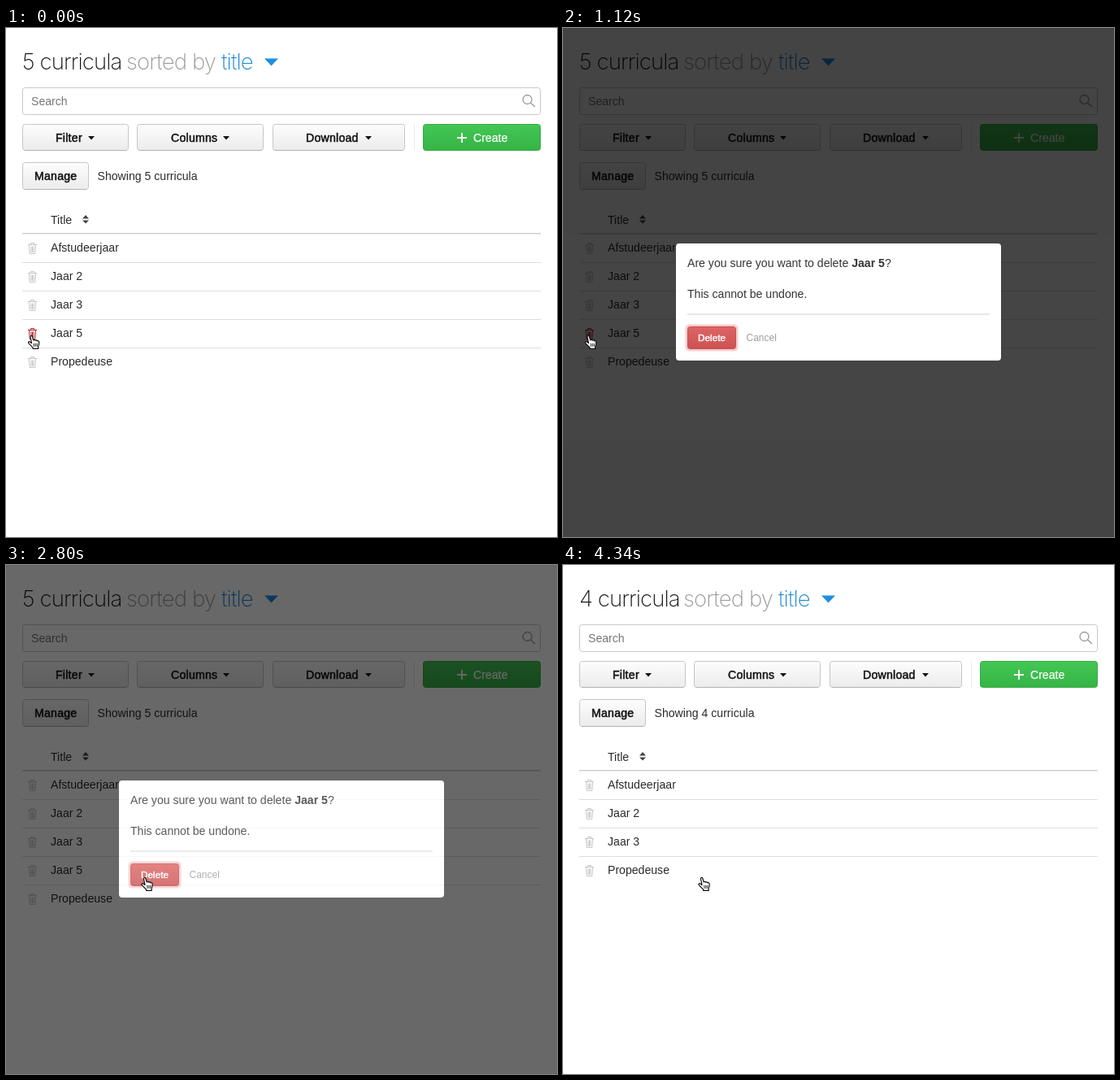
An HTML page that plays this animation: 678 by 626 pixels, repeating every 4410 ms.

```html
<!DOCTYPE html>
<html lang="en">
<head>
<meta charset="utf-8">
<title>Delete a curriculum</title>
<style>
  html, body { margin: 0; width: 100%; height: 100%; overflow: hidden; background: #ececec; }
  svg { display: block; width: 678px; height: 626px; }
  text { font: 14.1px "Liberation Sans", Arial, sans-serif; fill: #2b2b2b; white-space: pre; }
  .head { font: 200 27.5px Inter, Roboto, sans-serif; letter-spacing: -.85px; fill: #111; }
  .label { letter-spacing: .25px; fill: #111; stroke: #111; stroke-width: .5px; }
  .create { fill: #fff; stroke: #fff; stroke-width: .25px; }
  .small { font-size: 12px; }
  .rule { stroke: #dedede; }
  .trash { fill: none; stroke: #c6c6c6; }
  .trash.hot { stroke: #b3262c; }
</style>
</head>
<body>
<svg viewBox="0 0 678 626">
  <defs>
    <linearGradient id="grey" x2="0" y2="1"><stop stop-color="#fdfdfd"/><stop offset="1" stop-color="#ebebeb"/></linearGradient>
    <linearGradient id="green" x2="0" y2="1"><stop stop-color="#43c755"/><stop offset="1" stop-color="#35b445"/></linearGradient>
    <linearGradient id="red" x2="0" y2="1"><stop stop-color="#dd5d5d"/><stop offset="1" stop-color="#cb4a4a"/></linearGradient>
    <g id="bin">
      <path d="M27 266.5h11M30.5 266v-1.5h4v1.5M28.5 267l.7 10.5h6.6l.7-10.5M31 268.5v7.5M34 268.5v7.5M32.5 268.5v7.5"/>
    </g>
  </defs>

  <rect width="678" height="626" rx="4" fill="#fff"/>

  <text class="head" x="20" y="51"><tspan class="count">5</tspan> curricula</text>
  <text class="head" x="148" y="51" style="fill:#999">sorted by</text>
  <text class="head" x="265" y="51" style="fill:#1b87d6">title</text>
  <path d="M318 37.5h17l-8.5 9z" fill="#1f8fe0"/>

  <rect class="faint" x="20.5" y="73.5" width="637" height="33" rx="3" fill="none" stroke="#c9c9c9"/>
  <text x="31" y="95" style="fill:#777">Search</text>
  <g fill="none" stroke="#999" stroke-width="1.3">
    <circle cx="641.5" cy="88" r="5.5"/><path d="M645.5 92l5.5 5"/>
  </g>

  <g id="buttons"></g>
  <path d="M502.5 118v33" stroke="#ebebeb"/>
  <rect x="513.5" y="118.5" width="144" height="32" rx="3" fill="url(#green)" stroke="#36ab45"/>
  <path d="M555 135h12M561 129v12" stroke="#fff" stroke-width="1.8"/>
  <text class="create" x="575" y="140">Create</text>
  <text x="112.5" y="187">Showing <tspan class="count">5</tspan> curricula</text>

  <text x="55" y="241">Title</text>
  <path d="M94 234.5l4-4.5 4 4.5zM94 236.5h8l-4 4z" fill="#444"/>
  <path class="faint" d="M20 252.7h638" stroke="#cfcfcf" stroke-width="1.4"/>
  <g id="rows"></g>

  <g id="modal" opacity="0">
    <rect width="678" height="626" fill="#000" fill-opacity=".77"/>
    <rect x="139" y="265" width="400" height="144" rx="4" fill="#fff"/>
    <text x="153" y="294">Are you sure you want to delete <tspan font-weight="bold">Jaar 5</tspan>?</text>
    <text x="153" y="332">This cannot be undone.</text>
    <path d="M153 352h372" stroke="#e6e6e6" stroke-width="2"/>
    <rect x="150.5" y="364.5" width="65" height="33" rx="5" fill="#f6cccc"/>
    <rect x="153.5" y="367.5" width="59" height="27" rx="3" fill="url(#red)" stroke="#c24747"/>
    <text class="small" x="166" y="385" style="fill:#fff;stroke:#fff;stroke-width:.45px;font-size:11.8px">Delete</text>
    <text class="small" x="225.5" y="385" style="fill:#999">Cancel</text>
  </g>

  <g id="hand" stroke="#111" stroke-linejoin="round" stroke-linecap="round">
    <path fill="#fff" stroke-width="1.2" d="M3 2C2.6.4 4.9-.2 5.4 1.5L6.7 6C7.5 5 8.7 5.3 9 6.2C10 5.4 11.2 5.9 11.4 6.9C12.6 6.4 13.6 7 13.7 8.3C13.9 10.6 13.6 12 12.7 13.5V16.4H6.2L6 15C4.2 13.5 2.2 11 .8 9.6C-.2 8.2 1.3 7.2 2.5 8L4.5 9.6Z"/>
    <path d="M7.3 10.2l.2 3.2M9.3 10.2l.1 3.2M11.3 10.2v3.2" stroke-width=".9"/>
  </g>
</svg>
<script>
const LOOP = 4410, STEP = 70, REMOVED = 3220, ROW = 35;
const $ = id => document.getElementById(id);
const all = name => [...document.querySelectorAll(name)];

// Grey buttons: label, x, y, width, height, text x, caret x
$('buttons').innerHTML = [
  ['Filter', 20, 118, 131, 33, 61, 101],
  ['Columns', 161, 118, 156, 33, 203, 267],
  ['Download', 328, 118, 163, 33, 369, 442],
  ['Manage', 20, 165, 82, 34, 35, 0]
].map(([label, x, y, w, h, tx, caret]) => `
  <rect x="${x + .5}" y="${y + .5}" width="${w - 1}" height="${h - 1}" rx="3" fill="url(#grey)" stroke="#c6c6c6"/>
  <path d="M${x + 3} ${y + h - .5}h${w - 6}" stroke="#b2b2b2"/>
  <text class="label" x="${tx}" y="${y + 22}">${label}</text>
  ${caret ? `<path d="M${caret} 133h8l-4 4.5z" fill="#111"/>` : ''}`).join('');

$('rows').innerHTML = ['Afstudeerjaar', 'Jaar 2', 'Jaar 3', 'Jaar 5', 'Propedeuse'].map((name, i) => `
  <g class="row" transform="translate(0 ${i * ROW})">
    ${i ? '<path class="rule faint" d="M20 253.5h638"/>' : ''}
    <use class="trash faint" href="#bin"/>
    <text x="55" y="275">${name}</text>
  </g>`).join('');

const rows = all('.row'), counts = all('.count'), faint = all('.faint');
const doomed = rows[3], last = rows[4];
const hotBin = doomed.querySelector('.trash'), lastRule = last.querySelector('.rule');

const linear = k => k;
const smooth = k => k * k * (3 - 2 * k);

// Value at time t in a table of [ms, value]
function at(table, t, ease = linear) {
  const i = table.findIndex(([ms]) => ms > t);
  if (i === 0) return table[0][1];
  if (i < 0) return table[table.length - 1][1];
  const [a, from] = table[i - 1], [b, to] = table[i];
  return from + (to - from) * ease((t - a) / (b - a));
}

const shade = [[980, 0], [1050, .5], [1120, .95], [1190, 1], [2730, 1], [2800, .77], [2870, .42], [2940, .075], [3010, 0]];
const lines = [[1120, 1], [1260, .3], [2730, .3], [2800, 1]];
const handX = [[1400, 27], [1820, 163.5], [1960, 164], [2240, 166.5]];
const handY = [[1400, 378], [1820, 382], [1960, 382.5], [2240, 384]];

function draw(t) {
  const gone = t >= REMOVED;
  $('modal').setAttribute('opacity', at(shade, t));
  $('hand').setAttribute('transform', `translate(${at(handX, t, smooth)} ${at(handY, t, smooth)})`);
  const alpha = at(lines, t);
  faint.forEach(el => el.style.opacity = alpha);
  hotBin.classList.toggle('hot', t < 1540);
  counts.forEach(el => el.textContent = gone ? 4 : 5);
  doomed.style.display = gone ? 'none' : '';
  last.setAttribute('transform', `translate(0 ${ROW * (gone ? 3 : 4)})`);
}

const start = performance.now();
function tick() {
  const t = (performance.now() - start) % LOOP;
  draw(Math.floor(t / STEP) * STEP);
  requestAnimationFrame(tick);
}
tick();
</script>
</body>
</html>
```
